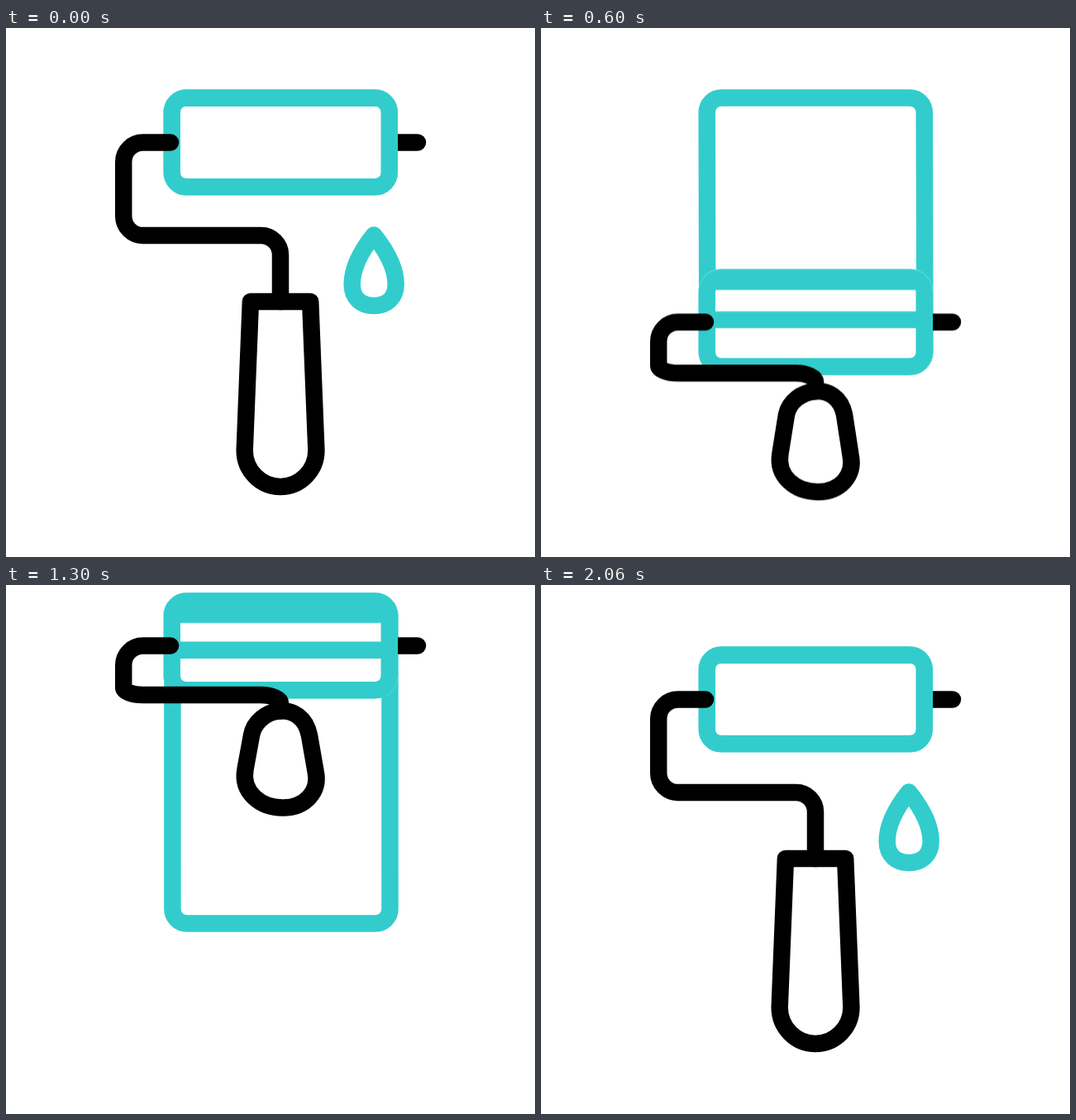
Animation of 640x640 px, one loop 2.4 s. Source, as an HTML page:

```html
<!DOCTYPE html>
<html lang="en">
<head>
<meta charset="utf-8">
<title>Paint roller</title>
<style>
  html, body { margin: 0; height: 100%; overflow: hidden; background: #fff; }
  svg { display: block; width: 100vw; height: 100vh; }

  path, rect {
    fill: none;
    stroke: #3cc;
    stroke-width: 20.5;
    stroke-linecap: round;
    stroke-linejoin: round;
  }
  .dark { stroke: #000; }
  .back { fill: #fff; stroke: none; }
  .handle { fill: #fff; }
  .bar { stroke-linecap: butt; }

  /* The shared curve is a plain smoothstep. */
  .tool, .paint, .arm, .handle, .bar, .drop {
    animation: 2400ms cubic-bezier(.3333, 0, .6667, 1) infinite;
  }
  .tool { animation-name: roll; }
  .paint { animation-name: spread, dry; }
  .arm { animation-name: bend; }
  .handle { animation-name: shorten; }
  .bar { animation-name: spin-a; animation-timing-function: linear; }
  .bar + .bar { animation-name: spin-b; }
  .drop { animation-name: drip; transform-origin: 445px 250px; }

  @keyframes roll {
    0%, 3.58% { transform: translateY(0); }
    25% { transform: translateY(217.3px); }
    56.4% { transform: translateY(-69px); }
    80.75%, 100% { transform: translateY(0); }
  }

  /* The painted area grows with the lowest and highest roller position. */
  @keyframes spread {
    0%, 3.58% {
      d: path("M218.2 84.5 L446.3 84.5 a17.5 17.5 0 0 1 17.5 17.5 L463.8 174.8 a17.5 17.5 0 0 1 -17.5 17.5 L218.2 192.3 a17.5 17.5 0 0 1 -17.5 -17.5 L200.7 102 a17.5 17.5 0 0 1 17.5 -17.5 Z");
    }
    25%, 46.4% {
      d: path("M218.2 84.5 L446.3 84.5 a17.5 17.5 0 0 1 17.5 17.5 L464.5 392.1 a17.5 17.5 0 0 1 -17.5 17.5 L218.9 409.6 a17.5 17.5 0 0 1 -17.5 -17.5 L200.7 102 a17.5 17.5 0 0 1 17.5 -17.5 Z");
      animation-timing-function: cubic-bezier(.3333, .575, .6667, 1);
    }
    56.4%, 100% {
      d: path("M218.9 15.5 L447 15.5 a17.5 17.5 0 0 1 17.5 17.5 L464.5 392.1 a17.5 17.5 0 0 1 -17.5 17.5 L218.9 409.6 a17.5 17.5 0 0 1 -17.5 -17.5 L201.4 33 a17.5 17.5 0 0 1 17.5 -17.5 Z");
    }
  }
  @keyframes dry {
    0%, 70.8% { opacity: 1; }
    79.2%, 100% { opacity: 0; }
  }

  @keyframes bend {
    0%, 85.83%, 100% {
      d: path("M199 138.5 L165.7 138.5 C152.7 138.5 142.2 149 142.2 162 L142.2 227.5 C142.2 240.5 152.7 251 165.7 251 L308.5 251 C321.5 251 332 261.5 332 274.5 L332 331");
    }
    28.6%, 59.5% {
      d: path("M199 138.5 L165.7 138.5 C152.7 138.5 142.2 149 142.2 162 L142.2 189 C142.2 194 152.7 198 165.7 198 L308.5 198 C321.5 198 332 203 332 208 L332 217.5");
    }
  }
  @keyframes shorten {
    0%, 85.83%, 100% {
      d: path("M295.9 331 C319.9 331 368.2 331 368.2 331 L375.4 511 C375.4 535 356 555 332 555 C308 555 288.7 535 288.7 511 Z");
    }
    28.6%, 59.5% {
      d: path("M297 247 C303 213 358 202 367 247 L374.5 290 C380 315 362 334.5 335 334.5 C308 334.5 284.5 316 289.5 288 Z");
    }
  }

  @keyframes spin-a {
    0%, 7.5% { transform: translateY(0); }
    16.67% { transform: translateY(24px); }
    34.17% { transform: translateY(81px); }
    45.83% { transform: translateY(128.8px); }
    54.17% { transform: translateY(166.8px); }
    69.17% { transform: translateY(245.6px); }
    83.3%, 100% { transform: translateY(323.4px); }
  }
  @keyframes spin-b {
    0% { transform: translateY(0); }
    16.67% { transform: translateY(95px); }
    34.17% { transform: translateY(131.8px); }
    45.83% { transform: translateY(215.6px); }
    54.17% { transform: translateY(231.6px); }
    69.17% { transform: translateY(277.6px); }
    81.25%, 100% { transform: translateY(323.4px); }
  }

  @keyframes drip {
    0%, 85.83%, 100% { transform: scale(1); }
    8.33%, 77.5% { transform: scale(0); }
  }
</style>
</head>
<body>
<svg viewBox="0 0 640 640">
  <defs>
    <clipPath id="face">
      <rect x="191" y="74.8" width="282.5" height="127.4" rx="27.5"/>
    </clipPath>
  </defs>

  <path class="drop" d="M445 250.5 C435 263 418.7 287 418.7 310 C418.7 327 430 336 445 336 S471.7 327 471.7 310 C471.7 287 455 263 445 250.5 Z"/>
  <path class="paint"/>

  <g class="tool">
    <path class="dark" d="M466 138.5 H498"/>
    <rect class="back" x="190.45" y="74.25" width="283.6" height="128.3" rx="27.75"/>
    <g clip-path="url(#face)">
      <path class="bar" d="M200 84.5 h264 M200 -23.3 h264 M200 -131.1 h264 M200 -238.9 h264"/>
      <path class="bar" d="M200 84.5 h264 M200 -23.3 h264 M200 -131.1 h264 M200 -238.9 h264"/>
    </g>
    <rect x="200.7" y="84.5" width="263.1" height="107.8" rx="17.5"/>
    <path class="handle dark"/>
    <path class="arm dark"/>
  </g>
</svg>
</body>
</html>
```
